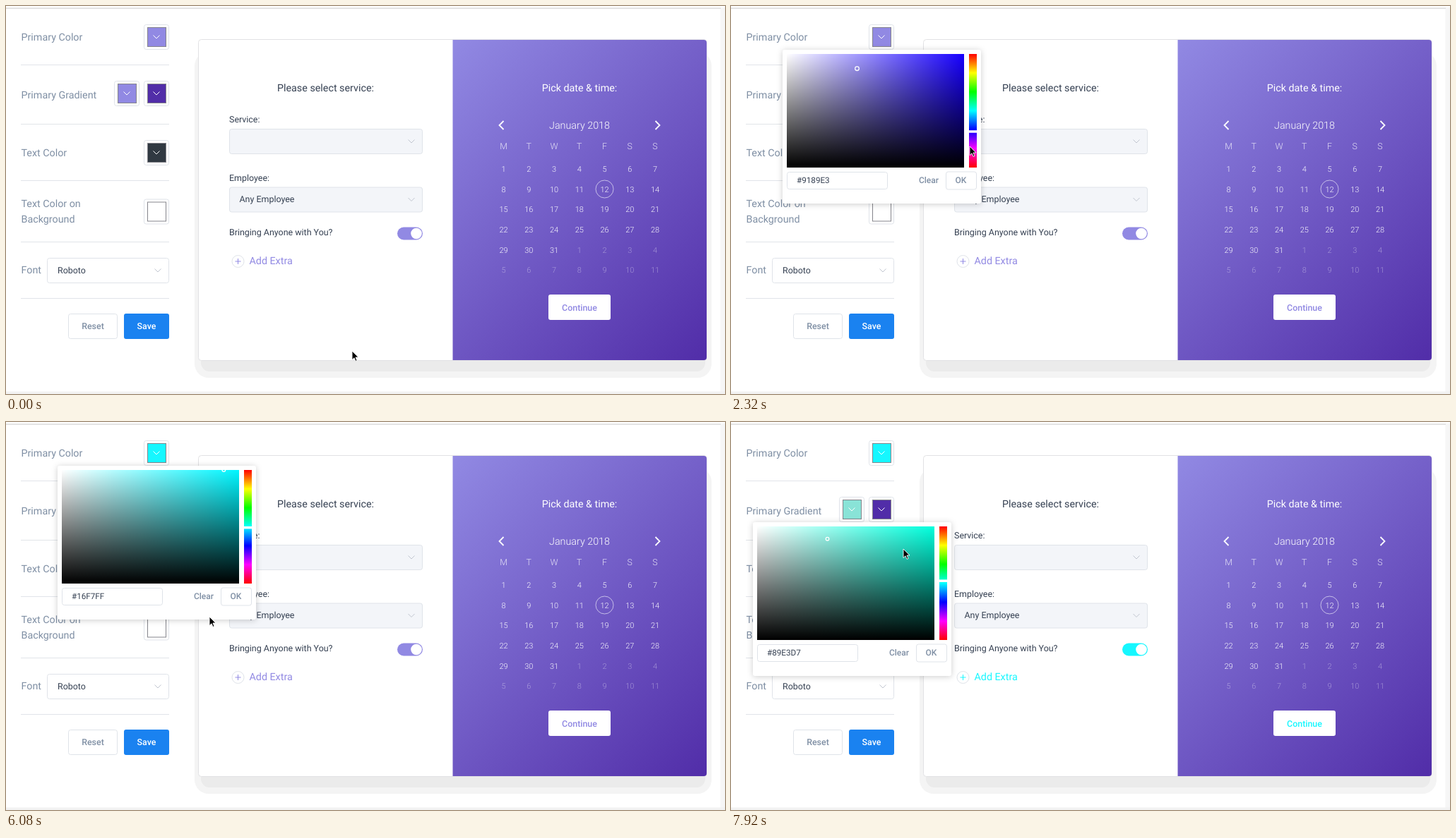
Recreate the animation shown at these times as an HTML page. Size 1018x550 px, loop 8000 ms.

```html
<!DOCTYPE html>
<html lang="en">
<head>
<meta charset="utf-8">
<title>Booking widget theme</title>
<style>
html, body { margin: 0; width: 100%; height: 100%; overflow: hidden; background: #fff; }
svg { display: block; font-family: Roboto, sans-serif; text-rendering: geometricPrecision; }
#popup { filter: drop-shadow(0 1px 4px rgba(0, 0, 0, .2)); }
</style>
</head>
<body>
<svg id="stage" width="1018" height="550" viewBox="0 0 1018 550"></svg>
<script>
const LOOP = 8000, STEP = 80;
const LILAC = '#9189E3', VIOLET = '#512DA8', INK = '#354052', GREY = '#7f8fa4', LINE = '#dfe3e9';

// Markup helpers
const box = (x, y, w, h, fill, more = '') =>
  `<rect x="${x}" y="${y}" width="${w}" height="${h}" fill="${fill}" ${more}/>`;
const frame = (x, y, w, h, fill = '#fff', more = '') =>
  box(x + .5, y + .5, w - 1, h - 1, fill, `stroke="${LINE}" rx="3" ${more}`);
const text = (x, cy, str, size, fill, more = '') =>
  `<text x="${x}" y="${cy + size * .36}" font-size="${size}" fill="${fill}" ${more}>${str}</text>`;
const mid = 'text-anchor="middle"', bold = 'font-weight="500"', light = 'font-weight="300"';
const chevron = (x, y, stroke) =>
  `<path d="M${x - 4.5} ${y - 2}l4.5 4.5 4.5-4.5" fill="none" stroke="${stroke}"/>`;
const swatch = (x, y, fill, id = '') => frame(x, y, 36, 36) +
  box(x + 5.5, y + 4.5, 26, 27, fill, `stroke="#85858c" ${id && `id="${id}"`}`) + chevron(x + 18, y + 17.5, '#fff');
const gradient = (id, attrs, stops) => `<linearGradient id="${id}" ${attrs}>` +
  stops.map(([c, o = 1], i) => `<stop offset="${i / (stops.length - 1)}" stop-color="${c}" stop-opacity="${o}"/>`).join('') +
  '</linearGradient>';
const down = 'x1="0" y1="0" x2="0" y2="1"';

function sidebar() {
  const label = (y, str) => text(21.5, y, str, 14.3, GREY);
  return [83, 167, 247, 334, 414].map(y => box(21, y, 210, 1, '#e1e4e9')).join('') +
    label(43.5, 'Primary Color') + label(125.5, 'Primary Gradient') + label(207.5, 'Text Color') +
    label(280, 'Text Color on') + label(301.5, 'Background') + label(374, 'Font') +
    swatch(195, 26, LILAC, 'primary') + swatch(153, 106, LILAC, 'start') + swatch(195, 106, VIOLET) +
    swatch(195, 190, '#303942') + swatch(195, 273.5, '#fff') +
    frame(58, 357, 173, 36) + text(73, 374.5, 'Roboto', 12.4, INK) + chevron(215, 374.5, '#c0c5cf') +
    frame(88, 436, 70, 36) + text(123, 454, 'Reset', 12.4, GREY, mid + bold) +
    box(167, 436, 64, 36, '#1a82f0', 'rx="3"') + text(199, 454, 'Save', 12.4, '#fff', mid + bold);
}

function calendar() {
  let out = '';
  const cell = (col, y, str, size, opacity) =>
    text(704.5 + 35.75 * col, y, str, size, '#fff', `${mid} ${light} opacity="${opacity}"`);
  [...'MTWTFSS'].forEach((day, i) => out += cell(i, 199, day, 12.4, .8));
  for (let i = 0; i < 42; i++)
    out += cell(i % 7, 231 + 28.7 * Math.floor(i / 7), i % 31 + 1, 11, i < 31 ? .95 : .4);
  return out + '<circle cx="847.5" cy="259.5" r="12.5" fill="none" stroke="#fff" opacity=".6"/>' +
    '<path d="M704.5 163l-6 6 6 6M919.5 163l6 6-6 6" fill="none" stroke="#fff" stroke-width="1.8"/>';
}

function card() {
  const select = y => frame(316, y, 274, 36, '#f3f5f9') + chevron(574, y + 17.5, '#c0c5cf');
  return box(267, 65, 732, 462, '#f4f4f4', 'rx="20"') + box(276, 78, 714, 440, '#ebebeb', 'rx="12"') +
    box(272.5, 47.5, 719.5, 455, '#fff', 'rx="4" stroke="#e2e2e4"') +
    '<path d="M632.5 48H988a4 4 0 0 1 4 4V498a4 4 0 0 1-4 4H632.5z" fill="url(#panel)"/>' +
    text(452.5, 116, 'Please select service:', 14.3, INK, mid) +
    text(316, 161, 'Service:', 12.45, INK) + select(174) +
    text(316, 243.5, 'Employee:', 12.45, INK) + select(256.5) + text(330.5, 274, 'Any Employee', 12.45, INK) +
    text(316, 320.5, 'Bringing Anyone with You?', 12.45, INK) +
    box(554, 313.5, 36, 18, 'currentColor', 'rx="9"') + '<circle cx="581" cy="322.5" r="7.8" fill="#fff"/>' +
    `<circle cx="328.5" cy="362" r="8.5" fill="none" stroke="${LINE}"/>` +
    '<path d="M324.5 362h8M328.5 358v8" stroke="currentColor"/>' +
    text(344.5, 361, 'Add Extra', 14.3, 'currentColor') +
    text(812, 116, 'Pick date &amp; time:', 14.3, '#fff', mid) +
    text(812, 169, 'January 2018', 14.3, '#fff', mid + light) + calendar() +
    box(768, 409, 88, 36, '#fff', 'rx="3"') + text(812, 427.5, 'Continue', 12.45, 'currentColor', mid + bold);
}

const popup = box(0, 0, 281, 218, '#fff', 'rx="3"') +
  box(6, 6, 251, 161, 'red', 'id="hue"') + box(6, 6, 251, 161, 'url(#white)') + box(6, 6, 251, 161, 'url(#black)') +
  '<circle id="marker" r="2.5" fill="none" stroke="#fff" stroke-width="1.3"/>' +
  box(264, 6, 11, 161, 'url(#rainbow)') + box(263, 0, 13, 3.5, '#fff', 'id="slider"') +
  frame(6, 173, 143, 25) + text(20, 185, '', 11.7, INK, 'id="hex"') +
  text(207, 185, 'Clear', 12, GREY, mid + bold) + frame(231, 172.5, 44, 26) + text(252.5, 185, 'OK', 12, GREY, mid + bold);

const stage = document.getElementById('stage');
stage.innerHTML = '<defs>' +
  gradient('panel', 'gradientUnits="userSpaceOnUse" x1="609" y1="71.5" x2="1016" y2="478.5"', [[LILAC], [VIOLET]]) +
  gradient('white', '', [['#fff'], ['#fff', 0]]) + gradient('black', down, [['#000', 0], ['#000']]) +
  gradient('rainbow', down, ['#f00', '#ff0', '#0f0', '#0ff', '#00f', '#f0f', '#f00'].map(c => [c])) + '</defs>' +
  box(0, 0, 1018, 550, '#fff') + box(1011.5, 2, 6.5, 548, '#f6f6f6') + box(0, 546.5, 1018, 3.5, '#f2f2f2') +
  box(0, 2.5, 1012, 1.5, '#dcdcdc') + `<g id="card">${card()}</g>` + sidebar() + `<g id="popup">${popup}</g>` +
  '<path id="cursor" d="M0 0V12.6L3 9.8 5 14.4 7 13.5 5 9H9z" fill="#000" stroke="#fff" stroke-width=".9"/>';

const el = {};
stage.querySelectorAll('[id]').forEach(node => el[node.id] = node);
const set = (id, attrs) => { for (const key in attrs) el[id].setAttribute(key, attrs[key]); };

// Cursor stops: time, x, y
const path = [
  [80, 490, 489], [880, 206, 52], [1120, 213, 43], [1360, 213, 44], [1520, 209.5, 58], [1840, 210, 59],
  [2320, 338, 199], [2640, 345, 198], [2800, 345, 195], [3360, 343.5, 151], [4080, 343.5, 151],
  [4880, 302, 78], [5440, 308, 67], [5680, 308, 67], [6080, 288, 276], [6320, 326, 246], [6480, 326, 246],
  [6720, 173, 122], [7040, 173, 122], [7280, 290, 218], [7440, 300, 225], [7680, 300, 225], [7920, 244, 180]
];

function cursorAt(t) {
  const i = path.findIndex(p => p[0] > t);
  if (i < 1) return (i ? path[path.length - 1] : path[0]).slice(1);
  const [a, b] = [path[i - 1], path[i]];
  const u = (t - a[0]) / (b[0] - a[0]), k = u * u * (3 - 2 * u);
  return [a[1] + (b[1] - a[1]) * k, a[2] + (b[2] - a[2]) * k];
}

function toHsv(hex) {
  const [r, g, b] = [1, 3, 5].map(i => parseInt(hex.slice(i, i + 2), 16) / 255);
  const v = Math.max(r, g, b), d = v - Math.min(r, g, b);
  const h = v === r ? (g - b) / d : v === g ? 2 + (b - r) / d : 4 + (r - g) / d;
  return [(h * 60 + 360) % 360, d / v, v];
}

const easeOut = (t, start, span) => 1 - (1 - Math.min(1, Math.max(0, (t - start) / span))) ** 3;

function draw(t) {
  const primary = t < 3600 ? LILAC : t < 5600 ? '#89E0E3' : '#16F7FF';
  const start = t < 7680 ? LILAC : '#89E3D7';
  const second = t >= 6700, hex = second ? start : primary;
  const open = second ? easeOut(t, 6737, 333) : easeOut(t, 1377, 333) - easeOut(t, 6440, 200);
  const [h, s, v] = toHsv(hex), untouched = hex === LILAC;

  set('primary', { fill: primary });
  set('start', { fill: start });
  set('card', { color: t < 6480 ? LILAC : primary });
  set('popup', {
    opacity: open, visibility: open > 0 ? 'visible' : 'hidden',
    transform: `translate(${second ? '31 142' : '73 62'}) scale(1 ${Math.max(open, .001)})`
  });
  set('hue', { fill: `hsl(${h} 100% 50%)` });
  set('marker', { cx: 6 + 251 * s, cy: 6 + 161 * (1 - v) + (untouched ? 3 : 0), r: untouched ? 2.8 : 2.3 });
  set('slider', { y: 4.5 + 161 * h / 360 });
  el.hex.textContent = hex;
  set('cursor', { transform: `translate(${cursorAt(t)})` });
}

const begin = performance.now();
function tick() {
  const t = (performance.now() - begin) % LOOP;
  draw(Math.floor(t / STEP) * STEP);
  requestAnimationFrame(tick);
}
tick();
</script>
</body>
</html>
```
